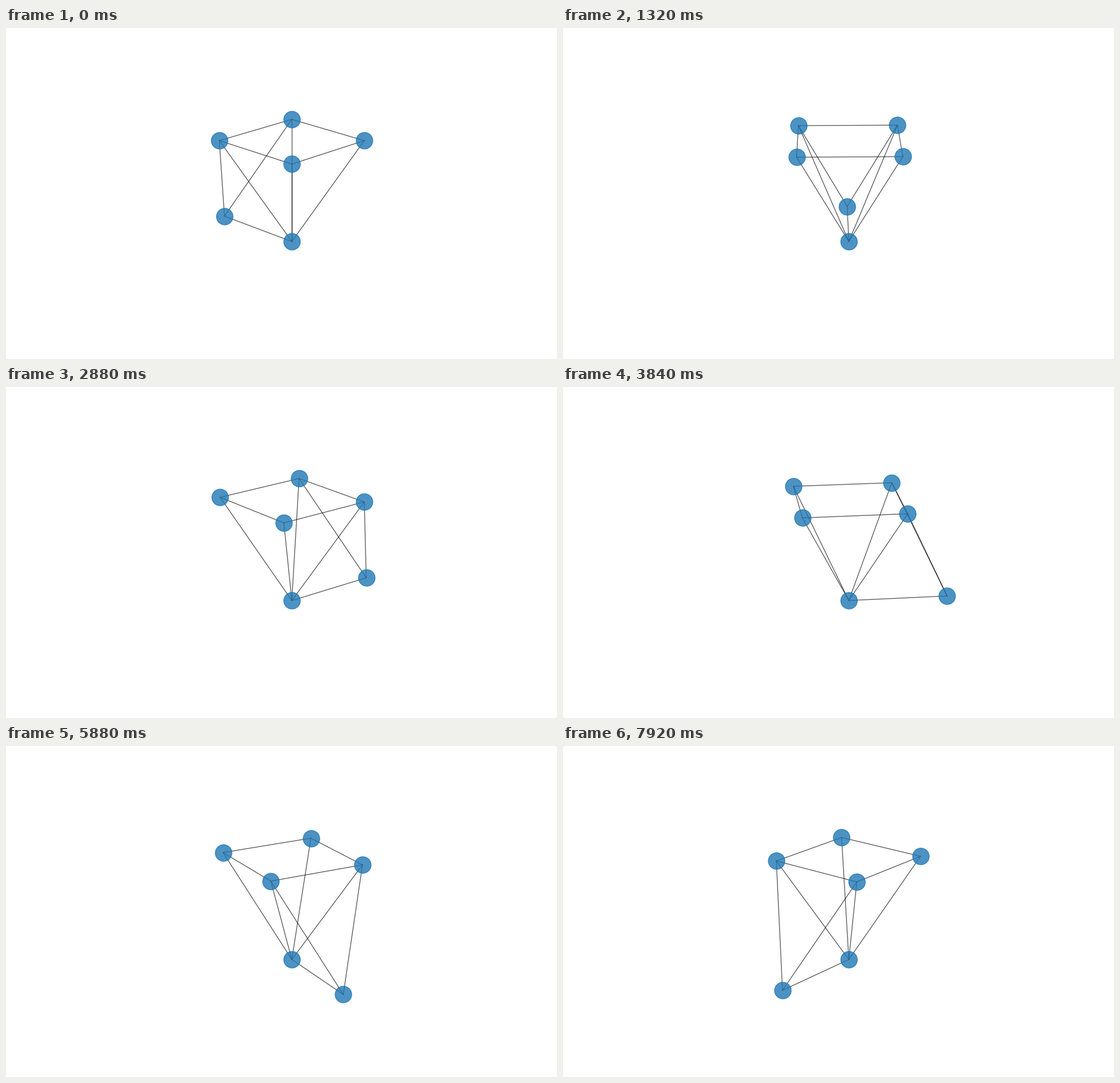
Write a matplotlib script that moves like this. It is 966 px wide and 580 px high and loops after 8000 ms.

```python
import numpy as np
import matplotlib.pyplot as plt
from matplotlib.animation import FuncAnimation

W, H, DPI = 966, 580, 100
TICK, TICKS = 40, 200          # ms per tick, ticks per loop
HOLD, STEP = 3, 4              # ticks per pose, degrees per pose

# perspective camera
ELEV = np.radians(20)
DIST = 10
SCALE = 0.77 * H / 0.185       # pixels per projected unit
CX, CY = 501.1, 286.9

R, Z = 0.5195, 0.3896          # half extents of the graph

# nodes as (radius, bearing from the back in degrees, height)
NODES = np.array([
    (R, 0, Z), (R, 90, Z), (R, 180, Z), (R, 270, Z),
    (0, 0, -Z),
    (R * np.sqrt(2), -45, -Z),
])
EDGES = [(0, 1), (1, 2), (2, 3), (3, 0),
         (4, 0), (4, 1), (4, 2), (4, 3),
         (5, 0), (5, 3), (5, 4)]


def project(turn):
    """Screen positions of all nodes after a turn in degrees."""
    radius, bearing, z = NODES.T
    psi = np.radians(bearing + turn)
    side, near = radius * np.sin(psi), -radius * np.cos(psi)
    up = z * np.cos(ELEV) - near * np.sin(ELEV)
    depth = DIST - near * np.cos(ELEV) - z * np.sin(ELEV)
    return np.column_stack([CX + SCALE * side / depth,
                            CY - SCALE * up / depth])


def pt(px):
    return px * 72 / DPI


fig = plt.figure(figsize=(W / DPI, H / DPI), dpi=DPI, facecolor="white")
ax = fig.add_axes([0, 0, 1, 1])
ax.set(xlim=(0, W), ylim=(H, 0))
ax.axis("off")

start = project(0)
lines = [ax.plot([], [], color="black", alpha=0.65, lw=pt(1.35), zorder=1)[0]
         for _ in EDGES]
dots = ax.scatter(*start.T, s=pt(29) ** 2, c="tab:blue", edgecolors="tab:blue",
                  linewidths=pt(1.4), alpha=0.8, zorder=2)


def update(tick):
    pos = project(STEP * (tick // HOLD))
    for line, (a, b) in zip(lines, EDGES):
        line.set_data(pos[[a, b], 0], pos[[a, b], 1])
    dots.set_offsets(pos)
    return [*lines, dots]


anim = FuncAnimation(fig, update, frames=TICKS, interval=TICK,
                     init_func=lambda: update(0), repeat=True, repeat_delay=0)
plt.show()
```
